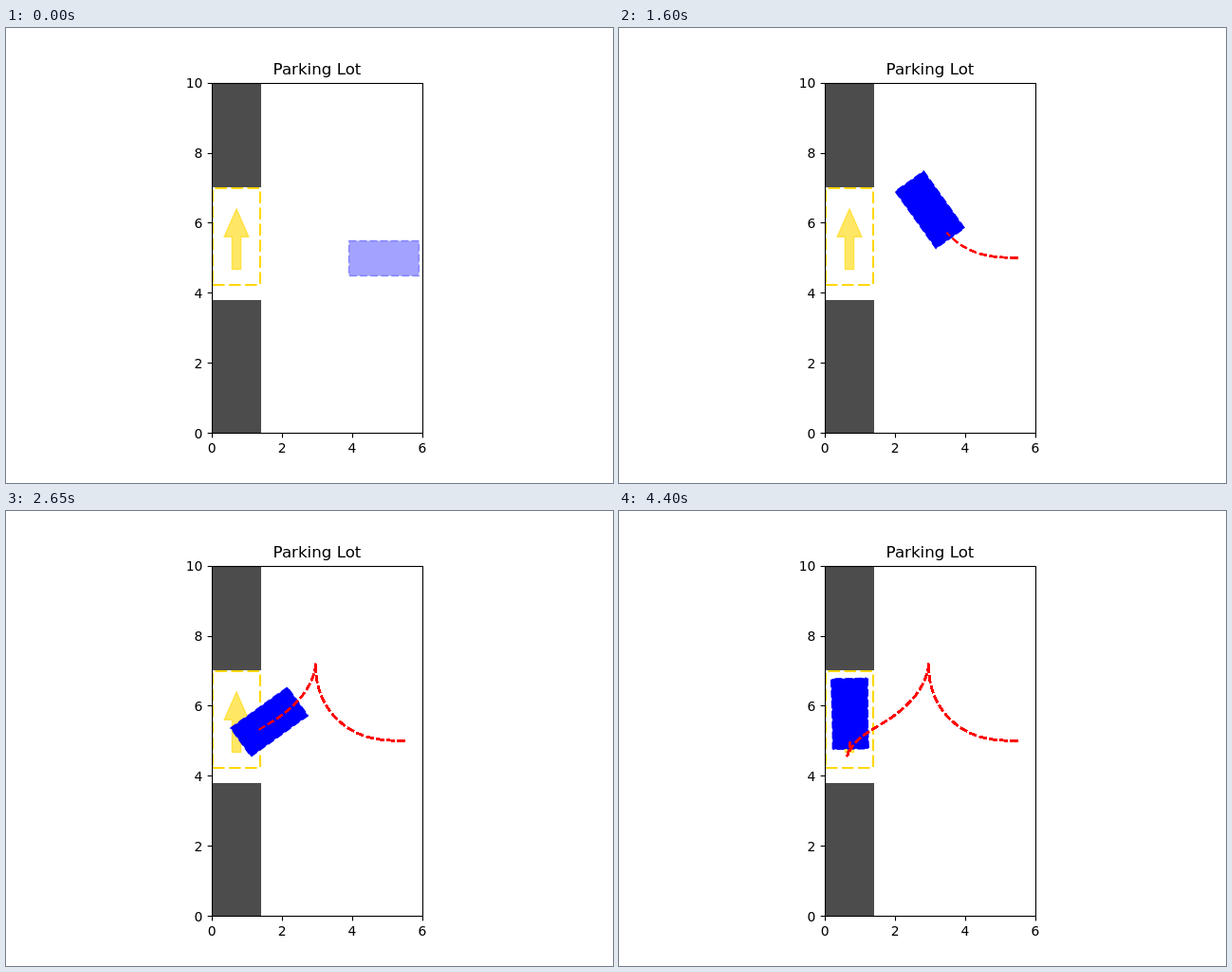
An HTML page with a canvas that plays this animation: 640 px wide and 480 px high, repeating every 5100 ms.

```html
<!DOCTYPE html>
<html lang="en">
<head>
<meta charset="utf-8">
<title>Parking Lot</title>
<style>
  html, body { margin: 0; width: 100%; height: 100%; overflow: hidden; background: #fff; }
  svg, canvas { position: absolute; left: 0; top: 0; width: 640px; height: 480px; }
  text { font: 13.89px "DejaVu Sans", sans-serif; }
  .title { font-size: 16.67px; }
</style>
</head>
<body>
<svg viewBox="0 0 640 480">
  <path fill="#4c4c4c" d="M217 58H269V168H217ZM217 287H269V427H217Z"/>
  <path fill="none" stroke="#ffd700" stroke-width="2.08" stroke-dasharray="12.5 4.5" d="M218 271H268V169H218Z"/>
  <path fill="#ffd700" fill-opacity=".6" stroke="#ffd700" stroke-opacity=".6" stroke-width="1.39"
    d="M238.4 254.5V220.2H230.1L243 191L255.9 220.2H247.6V254.5Z"/>
  <rect x="217.5" y="58.5" width="222" height="369" fill="none" stroke="#000" stroke-width="1.11"/>
  <g id="ticks" stroke-width="1.11"></g>
  <text class="title" x="328" y="49" text-anchor="middle">Parking Lot</text>
</svg>
<canvas id="stage" width="640" height="480"></canvas>
<script>
const LOOP = 5100, TICK = 50, START = 1000;
const UNIT = 36.96, SPEED = 0.203 * UNIT;
const px = x => 217.12 + UNIT * x;
const py = y => 427.2 - UNIT * y;
const snap = v => Math.floor(v + 0.5) + 0.5;

// Axis ticks and labels
let marks = '';
for (let v = 0; v <= 10; v += 2) {
  const x = px(v), y = py(v);
  marks += `<path stroke="#000" d="M217.5 ${snap(y)}h-4.9"/>
    <text x="207.4" y="${Math.round(y + 5.3)}" text-anchor="end">${v}</text>`;
  if (v <= 6) {
    marks += `<path stroke="#000" d="M${snap(x)} 427.5v4.9"/>
      <text x="${x}" y="448" text-anchor="middle">${v}</text>`;
  }
}
document.getElementById('ticks').innerHTML = marks;

// Rear-axle poses; angle 0 faces left and grows clockwise
const poses = [{ x: px(5.5), y: py(5), a: 0 }];

// Drives some steps while the turn per step eases linearly
function drive(steps, gear, from, to) {
  for (let i = 0; i < steps; i++) {
    const p = poses[poses.length - 1];
    const turn = from + (to - from) * i / (steps - 1);
    const mid = p.a + turn / 2;
    poses.push({
      x: p.x - gear * SPEED * Math.cos(mid),
      y: p.y - gear * SPEED * Math.sin(mid),
      a: p.a + turn
    });
  }
}
drive(5, 1, 0.02, 0.08);
drive(14, 1, 0.1, 0.1);
drive(9, -1, 0.14, 0.046);
drive(9, -1, 0.075, -0.2);
drive(3, 1, -0.13, -0.13);
const LAST = poses.length - 1;

// Opacity of n stacked layers of 20 %
const layers = n => 1 - 0.8 ** n;

const ctx = document.getElementById('stage').getContext('2d');

function drawCar(x, y, angle, alpha) {
  ctx.save();
  ctx.globalAlpha = alpha;
  ctx.fillStyle = ctx.strokeStyle = '#00f';
  ctx.lineWidth = 1.39;
  ctx.translate(x, y);
  ctx.rotate(angle);
  ctx.beginPath();
  ctx.rect(-1.6 * UNIT, -0.5 * UNIT, 2 * UNIT, UNIT);
  ctx.fill();
  ctx.stroke();
  ctx.restore();
}

// The path is stroked again on every step, so older parts look heavier
function drawTrail(step) {
  ctx.strokeStyle = '#f00';
  ctx.lineWidth = 2.08;
  ctx.lineJoin = 'round';
  ctx.setLineDash([7.7, 3.33]);
  for (let n = 2; n <= step; n++) {
    ctx.beginPath();
    for (const p of poses.slice(0, Math.min(n, LAST))) ctx.lineTo(p.x, p.y);
    ctx.stroke();
  }
}

function draw(t) {
  const tick = Math.floor(t / TICK);
  const step = Math.max(0, tick - START / TICK);
  const { x, y, a } = poses[Math.min(step, LAST)];
  ctx.clearRect(0, 0, 640, 480);
  if (step === 0) {
    drawCar(x + 0.28, y + 0.6, 0, layers(tick + 2));
  } else {
    drawCar(x, y, a, 1);
    if (step > LAST) drawCar(x - 0.4, y, Math.PI / 2, layers(step - LAST));
  }
  drawTrail(Math.min(step, LAST + 10));
}

const begin = performance.now();
function loop() {
  draw((performance.now() - begin) % LOOP);
  requestAnimationFrame(loop);
}
loop();
</script>
</body>
</html>
```
